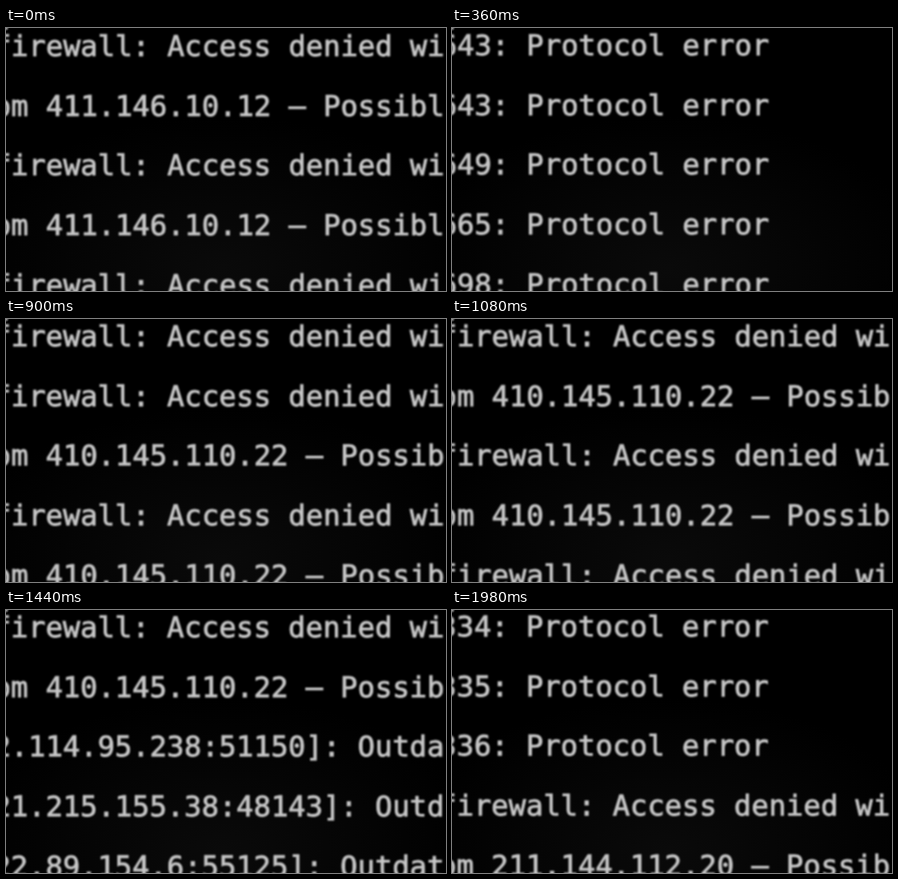
Animation, 550 px wide and 329 px high, one loop 2160 ms. Source, as an HTML page:

```html
<!DOCTYPE html>
<html lang="en">
<head>
<meta charset="utf-8">
<title>Log scroll</title>
<style>
  html, body { margin: 0; width: 100%; height: 100%; overflow: hidden; background: #000; }
  #stage {
    position: relative; width: 100%; height: 100%; overflow: hidden; contain: strict;
    background:
      radial-gradient(circle at 0 0, #bbb 0, #0000 4px),
      radial-gradient(330px 190px at 270px 300px, #0a0a0a, #000);
  }
  pre {
    position: absolute; left: 0; top: 0; margin: 0;
    font: 36px/74.7px "DejaVu Sans Mono", monospace;
    color: #c6c6c6; -webkit-text-stroke: .9px #c6c6c6;
    filter: blur(.9px);
  }
</style>
</head>
<body>
<div id="stage"><pre id="log"></pre></div>
<script>
const STEP = 180, ROWS = 5, COLS = 26;
const deny = "firewall: Access denied with";
const from = ip => `om ${ip} – Possible`;
const A = from("411.146.10.12");
const B = from("410.145.110.22");
const proto = id => `${id}: Protocol error`;
const old = addr => `${addr}]: Outdated`;

const outdated = ["2.114.95.238:51150", "21.215.155.38:48143",
  "22.89.154.6:55125", "90.196.51.130:39502"].map(old);
const errors = [332, 333, 334, 335, 336].map(proto);
const burst = [640, 641, 643, 643, 649, 665, 698].map(proto);
const tail = [B, deny, B, deny, B, ...outdated, ...errors, deny, from("211.144.112.20")];

// Each screen is a five-line window on the log.
const view = (lines, start) => lines.slice(start, start + ROWS);
const screens = [
  [deny, A, deny, A, deny],
  view([deny, ...burst], 0),
  view(burst, 2),
  [deny, B, deny, A, deny],
  [deny, A, deny, B, deny],
  [deny, deny, B, deny, B],
  [deny, B, deny, B, deny],
  view(tail, 0),
  view(tail, 3),
  view(tail, 5),
  view(tail, 8),
  view(tail, 11)
];

const log = document.getElementById("log");
let shown = -1;

function draw(now) {
  const i = Math.floor(now / STEP) % screens.length;
  if (i === shown) return;
  shown = i;
  const drift = -1.2 * (i / 11) ** 2;
  log.textContent = screens[i].map(line => line.slice(0, COLS)).join("\n");
  log.style.transform = `translate(${-15.3 + drift / 2}px, ${-14.5 + drift}px)`;
}

const start = performance.now();
function tick() {
  draw(performance.now() - start);
  requestAnimationFrame(tick);
}
tick();
</script>
</body>
</html>
```
